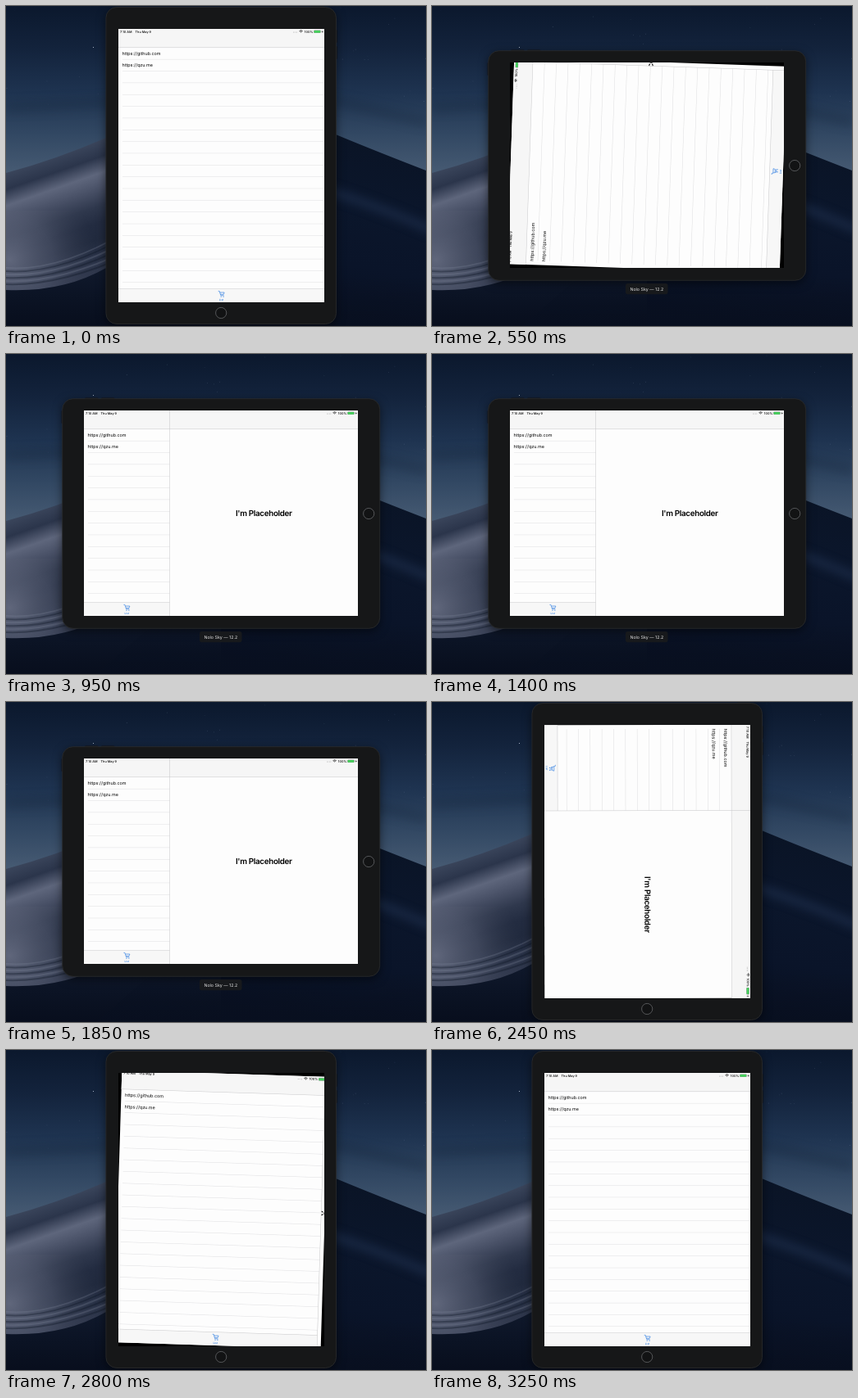
An HTML page with a canvas that plays this animation: 512 by 391 pixels, repeating every 3.3 s.

```html
<!DOCTYPE html>
<html lang="en">
<head>
<meta charset="utf-8">
<title>Tablet rotation</title>
<style>
html, body { margin: 0; width: 100%; height: 100%; overflow: hidden; background: #0a1326; }
canvas { display: block; width: 512px; height: 391px; }
</style>
</head>
<body>
<canvas id="stage"></canvas>
<script>
const W = 512, H = 391, LOOP = 3300, STEP = 50;
const TURN = 400, TO_LANDSCAPE = 508, TO_PORTRAIT = 2440;
const SHORT = 251, LONG = 334, LIST = 104.5;
const BAR = 22.8, TAB = 16.3, ROW = 14.35, INSET = 4.9;
const BLUE = '#2f7de1';
const URLS = ['https://github.com', 'https://qzu.me'];
const DEVICE = 'Nolo Sky — 12.2';

const dpr = window.devicePixelRatio || 1;
const stage = document.getElementById('stage');
const backdrop = document.createElement('canvas');
const open = canvas => {
  canvas.width = W * dpr;
  canvas.height = H * dpr;
  const c = canvas.getContext('2d');
  c.scale(dpr, dpr);
  c.textRendering = 'geometricPrecision';
  return c;
};
const ctx = open(stage);

const lerp = (a, b, k) => a + (b - a) * k;

// cubic-bezier(.42, 0, .58, 1), solved by bisection
function ease(x) {
  if (x <= 0) return 0;
  if (x >= 1) return 1;
  let lo = 0, hi = 1, s = 0.5;
  for (let i = 0; i < 24; i++) {
    s = (lo + hi) / 2;
    const r = 1 - s;
    const at = 3 * r * r * s * 0.42 + 3 * r * s * s * 0.58 + s * s * s;
    if (at < x) lo = s; else hi = s;
  }
  return s * s * (3 - 2 * s);
}

function addStops(g, colors) {
  colors.forEach((color, i) => g.addColorStop(i / (colors.length - 1), color));
  return g;
}

const ramp = (c, x0, y0, x1, y1, colors) => addStops(c.createLinearGradient(x0, y0, x1, y1), colors);
const glow = (c, x, y, r, colors) => addStops(c.createRadialGradient(x, y, 0, x, y, r), colors);

function shape(c, path, fill) {
  c.fillStyle = fill;
  c.fill(new Path2D(path));
}

function softLine(c, path, color, width, blur) {
  c.filter = `blur(${blur * dpr}px)`;
  c.strokeStyle = color;
  c.lineWidth = width;
  c.stroke(new Path2D(path));
  c.filter = 'none';
}

function paintBackdrop() {
  const c = open(backdrop);
  c.fillStyle = ramp(c, 0, 0, 0, 210, ['#0b182d', '#13233c', '#1e3350', '#324863', '#495d75']);
  c.fillRect(0, 0, W, H);
  softLine(c, 'M0 124 L130 118 M400 116 L512 142', 'rgba(18,32,54,.25)', 12, 6);

  let seed = 11;
  const rnd = () => (seed = seed * 16807 % 2147483647) / 2147483647;
  for (let i = 0; i < 45; i++) {
    c.fillStyle = `rgba(190,208,235,${0.08 + rnd() * 0.25})`;
    c.fillRect(rnd() * W, rnd() * 150, 0.7, 0.7);
  }
  c.fillStyle = 'rgba(225,235,250,.7)';
  c.fillRect(106, 50, 1, 1);

  // shaded right dune
  const right = 'M230 130 Q340 138 402 157 Q450 177 512 201 V391 H230 Z';
  shape(c, right, ramp(c, 440, 165, 400, 391, ['#0a1426', '#0b162b', '#0a1429', '#080f20']));
  c.save();
  c.clip(new Path2D(right));
  softLine(c, 'M330 208 Q420 230 520 274', 'rgba(36,54,86,.6)', 10, 6);
  c.restore();

  // lit left dune: ridge, shaded hollow, bright lobe with ripples
  const left = 'M0 204 Q60 188 122 161 Q200 132 262 130 V391 H0 Z';
  shape(c, left, ramp(c, 61, 183, 117, 343, [
    '#3a455b', '#2b354b', '#5e667c', '#474f65', '#2f384d',
    '#232c41', '#212a3e', '#283146', '#2f374c', '#2a3247']));
  c.save();
  c.clip(new Path2D(left));
  shape(c, 'M0 250 H150 V391 H0 Z', glow(c, 5, 310, 105, ['rgba(116,122,143,.75)', 'rgba(90,97,118,.5)', 'rgba(60,67,86,0)']));
  c.restore();
  for (let i = 0; i < 6; i++) {
    const color = i % 2 ? 'rgba(14,20,36,.35)' : 'rgba(130,138,160,.25)';
    softLine(c, `M0 ${320 + i * 4} Q65 ${325 + i * 3.5} 150 ${274 + i * 6}`, color, 2, 0.7);
  }
  shape(c, 'M0 347 Q70 350 122 320 Q180 285 262 270 V391 H0 Z',
    ramp(c, 0, 320, 0, 391, ['#10192c', '#0b1324', '#080e1d']));
  shape(c, 'M180 330 H512 V391 H110 Z',
    ramp(c, 0, 330, 0, 391, ['rgba(9,17,34,0)', 'rgba(8,15,31,.8)']));
}

function text(s, x, y, size, weight = 400, color = '#000', align = 'left', spacing = 0) {
  ctx.font = `${weight} ${size}px Inter, "Open Sans", sans-serif`;
  ctx.letterSpacing = `${spacing}px`;
  ctx.fillStyle = color;
  ctx.textAlign = align;
  ctx.fillText(s, x, y);
}

function box(x, y, w, h, color) {
  ctx.fillStyle = color;
  ctx.fillRect(x, y, w, h);
}

function rounded(x, y, w, h, r, fill) {
  ctx.beginPath();
  ctx.roundRect(x, y, w, h, r);
  ctx.fillStyle = fill;
  ctx.fill();
}

function body(landscape) {
  ctx.save();
  ctx.translate(262.2, 195);
  if (landscape) ctx.rotate(-Math.PI / 2);
  rounded(139, -166, 2.4, 16, 1, '#17181a');
  rounded(139, -146, 2.4, 16, 1, '#17181a');
  rounded(110, -194.6, 16, 2.4, 1, '#17181a');
  ctx.shadowColor = 'rgba(0,0,0,.55)';
  ctx.shadowBlur = 12 * dpr;
  ctx.shadowOffsetY = 3 * dpr;
  rounded(-140.3, -193.5, 280.6, 387, 13, '#161718');
  ctx.shadowColor = 'transparent';
  ctx.strokeStyle = '#2b2c2e';
  ctx.lineWidth = 0.8;
  ctx.stroke();
  ctx.beginPath();
  ctx.arc(0, 180, 6.6, 0, 7);
  ctx.fillStyle = '#121314';
  ctx.fill();
  ctx.strokeStyle = '#66686a';
  ctx.stroke();
  ctx.restore();
}

function statusBar(w) {
  text('7:10 AM', 2, 4.5, 3.85, 500);
  text('Thu May 9', 20.6, 4.5, 3.85, 500);
  for (let i = 0; i < 4; i++) box(w - 38 + i * 1.5, 3.7, 0.7, 0.7, '#999');
  ctx.strokeStyle = '#111';
  ctx.lineWidth = 0.7;
  for (const r of [0.5, 1.7, 2.9]) {
    ctx.beginPath();
    ctx.arc(w - 28.4, 4.7, r, -Math.PI * 0.76, -Math.PI * 0.24);
    ctx.stroke();
  }
  text('100%', w - 13.8, 4.5, 3.85, 500, '#000', 'right');
  rounded(w - 12.8, 1.6, 8.4, 3.5, 0.9, '#8b9490');
  rounded(w - 12.4, 2, 7.6, 2.7, 0.6, '#45d15b');
  box(w - 4.1, 2.8, 0.5, 1.1, '#8b9490');
  shape(ctx, `M${w - 1.9} 1.7 l-1.2 2 h.9 l-.4 1.5 l1.4 -2.1 h-.9 Z`, '#222');
}

function cart(x, y) {
  ctx.save();
  ctx.translate(x, y);
  ctx.strokeStyle = BLUE;
  ctx.lineWidth = 0.65;
  ctx.stroke(new Path2D('M-3.8 -3.6 H-2.3 L-.7 1.7 H3.1 M-1.8 -2 H3.6 L2.8 .3 H-1.1'));
  ctx.fillStyle = BLUE;
  for (const wheel of [-0.3, 2.6]) {
    ctx.beginPath();
    ctx.arc(wheel, 3.1, 0.65, 0, 7);
    ctx.fill();
  }
  ctx.restore();
}

// p is 0 for the portrait layout and 1 for the landscape layout
function app(p) {
  const w = lerp(SHORT, LONG, p), h = lerp(LONG, SHORT, p);
  const list = lerp(SHORT, LIST, p);
  ctx.translate(-w / 2, -h / 2);
  box(0, 0, w, h, '#fdfdfd');

  for (let y = BAR + ROW; y < h - TAB; y += ROW) box(INSET, y - 0.25, list - INSET, 0.5, '#dedee0');
  URLS.forEach((url, i) => text(url, INSET - 0.3, BAR + 9 + i * ROW, 5.4));

  box(0, h - TAB, list, TAB, '#f7f7f7');
  box(0, h - TAB - 0.25, list, 0.5, '#c6c6c8');
  cart(list / 2, h - 10);
  text('List', list / 2, h - 2, 3.2, 500, BLUE, 'center');

  if (p > 0) {
    ctx.save();
    ctx.beginPath();
    ctx.rect(list, 0, w - list, h);
    ctx.clip();
    text("I'm Placeholder", (list + w) / 2, h / 2 + 3.4, 9.8, 600, '#000', 'center', -0.32);
    ctx.restore();
  }

  box(0, 0, w, BAR, '#f6f6f6');
  box(0, BAR - 0.25, w, 0.5, '#c8c8ca');
  if (p > 0) box(list - 0.25, 0, 0.5, h, '#c4c4c6');
  statusBar(w);
}

function draw(t) {
  const landscape = t >= TO_LANDSCAPE && t < TO_PORTRAIT;
  const p = t < TO_PORTRAIT ? ease((t - TO_LANDSCAPE) / TURN) : 1 - ease((t - TO_PORTRAIT) / TURN);
  const angle = landscape ? (p - 1) * Math.PI / 2 : p * Math.PI / 2;
  const [x, y, w, h] = landscape ? [95, 69, LONG, SHORT] : [137, 28, SHORT, LONG];

  ctx.drawImage(backdrop, 0, 0, W, H);
  body(landscape);
  if (landscape) {
    rounded(236, 339, 51.5, 13.2, 2.6, '#17191c');
    text(DEVICE, 261.8, 347.6, 5.3, 400, '#e4e4e4', 'center');
  }

  ctx.save();
  ctx.beginPath();
  ctx.rect(x, y, w, h);
  ctx.clip();
  box(x, y, w, h, '#000');
  ctx.translate(x + w / 2, y + h / 2);
  ctx.rotate(angle);
  app(p);
  ctx.restore();
}

paintBackdrop();
const start = performance.now();
function tick() {
  const t = (performance.now() - start) % LOOP;
  draw(Math.floor(t / STEP) * STEP);
  requestAnimationFrame(tick);
}
tick();
</script>
</body>
</html>
```
